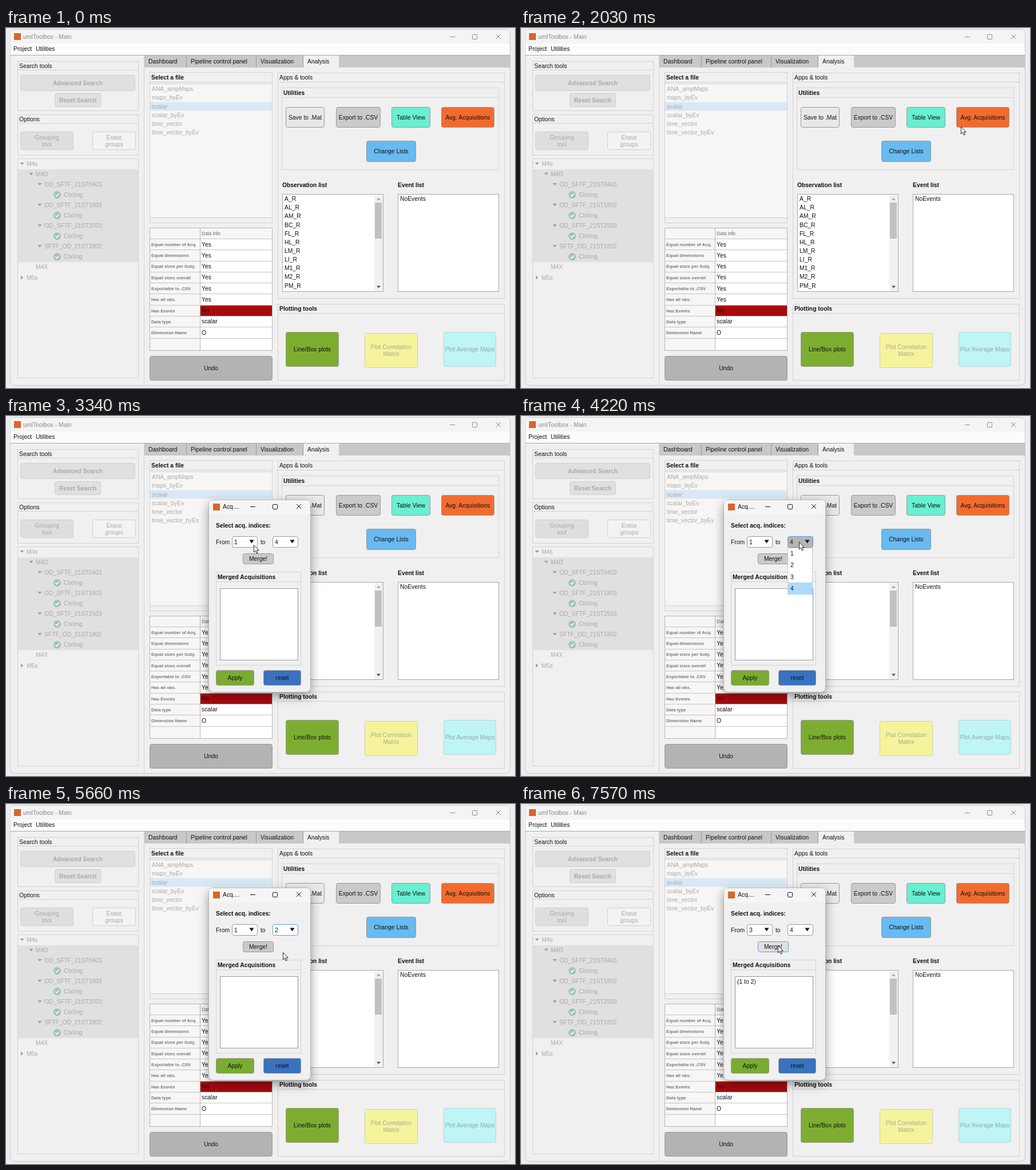
These frames come from a looping animation (890 px wide and 629 px high, 8000 ms). An HTML page:

```html
<!DOCTYPE html>
<html lang="en">
<head>
<meta charset="utf-8">
<title>Toolbox</title>
<style>
  html, body { margin: 0; width: 100%; height: 100%; overflow: hidden; background: #ededed; }
  svg { display: block; }
  text { font: 10.35px "Liberation Sans", Arial, sans-serif; white-space: pre; }
  .b { font-weight: bold; }
  .m { text-anchor: middle; }
  .s { font-size: 7.7px; }
  #dialog { filter: drop-shadow(0 7px 9px rgba(0, 0, 0, .38)); }
</style>
</head>
<body>
<svg id="stage" width="890" height="629" viewBox="0 0 890 629"></svg>
<script>
const LINE = '#d2d2d2', BG = '#f0f0f0', DIM = '#a9a9a9', EDGE = '#999';

// Corner-to-corner box with a one pixel border
const box = (x, y, x2, y2, fill, stroke = LINE, r = 0, id = '') =>
  `<rect id="${id}" x="${x + .5}" y="${y + .5}" width="${x2 - x}" height="${y2 - y}" rx="${r}" fill="${fill}" stroke="${stroke}"/>`;
const fillBox = (x, y, x2, y2, fill) =>
  `<rect x="${x}" y="${y}" width="${x2 - x}" height="${y2 - y}" fill="${fill}"/>`;
const path = (d, stroke, fill = 'none', extra = '') => `<path d="${d}" stroke="${stroke}" fill="${fill}" ${extra}/>`;
const hline = (x, x2, y, c = LINE) => path(`M${x} ${y + .5}H${x2}`, c);
const vline = (x, y, y2, c = LINE) => path(`M${x + .5} ${y}V${y2}`, c);
// Text is placed by the vertical middle of its capitals
const text = (x, y, s, fill = '#111', cls = '', id = '') =>
  `<text id="${id}" x="${x}" y="${y + 3.6}" fill="${fill}" class="${cls}">${s}</text>`;
const panel = (x, y, x2, y2, title, bar, cls = '') =>
  box(x, y, x2, y2, 'none') + hline(x, x2, bar) + text(x + 3, (y + bar) / 2 + .5, title, '#111', cls);
const button = (x, y, x2, y2, fill, label, o = {}) => {
  const rows = label.split('|'), mid = (y + y2) / 2 + .5;
  return box(x, y, x2, y2, fill, o.edge || EDGE, 3, o.id) + rows.map((row, i) =>
    text((x + x2) / 2 + .5, mid + (i - (rows.length - 1) / 2) * 12, row, o.color, 'm ' + (o.cls || ''))).join('');
};
const down = (x, y, w, h, fill) => path(`M${x - w} ${y - h}H${x + w}L${x} ${y + h}Z`, 'none', fill);
const logo = (x, y) => fillBox(x, y, x + 12, y + 12, '#d9662b');
const windowIcons = (a, b, c, y) =>
  path(`M${a} ${y + .5}h9M${b + .5} ${y - 3.5}h6q1 0 1 1v6q0 1-1 1h-6q-1 0-1-1v-6q0-1 1-1M${c} ${y - 4}l8 8m0-8l-8 8`, 'currentColor');

function mainWindow() {
  let s = box(7, 2, 881, 624, BG, '#c9c9c9', 8);
  s += path('M7.5 46V11q0-8 8-8H873q8 0 8 8V46Z', 'none', '#f4f4f4');
  s += fillBox(8, 27, 881, 47, '#fcfcfc') + hline(8, 881, 47, '#a5aba5');
  s += logo(14, 9);
  s += `<g id="caption">${text(30, 15.5, 'umIToolbox - Main', 'currentColor')}${windowIcons(776, 816, 857, 15)}</g>`;
  s += text(13, 36, 'Project') + text(52, 36, 'Utilities');

  // Tabs
  s += fillBox(242, 48, 881, 69, '#c8c8c8') + vline(241, 48, 624);
  s += fillBox(520, 48, 582, 70, BG);
  [315, 437, 519].forEach(x => s += vline(x, 49, 69, '#999'));
  s += text(249, 58.5, 'Dashboard') + text(323, 58.5, 'Pipeline control panel') +
    text(445, 58.5, 'Visualization') + text(527, 58.5, 'Analysis');
  return s;
}

function sidebar() {
  const off = { color: DIM, edge: '#cfcfcf' }, offBold = { ...off, cls: 'b' };
  let s = panel(20, 58, 231, 144, 'Search tools', 73) + panel(20, 151, 231, 222, 'Options', 166);
  s += button(25, 82, 225, 109, '#e0e0e0', 'Advanced Search', offBold);
  s += button(85, 114, 165, 137, '#e0e0e0', 'Reset Search', offBold);
  s += button(25, 181, 117, 212, '#dedede', 'Grouping|tool', off);
  s += button(151, 181, 226, 212, '#f3f3f3', 'Erase|groups', off);
  s += box(20, 228, 231, 611, BG) + fillBox(21, 247, 231, 409, '#e0e0e0');
  const node = (x, y, label) => down(x - 8, y, 3.5, 2, '#999') + text(x, y, label, DIM);
  s += node(36, 237, 'M4s') + node(52, 255, 'M4D');
  ['OD_SFTF_21ST0403', 'OD_SFTF_21ST1803', 'OD_SFTF_21ST2503', 'SFTF_OD_21ST1802'].forEach((name, i) => {
    const y = 273 + i * 36.1;
    s += node(67, y, name) + `<circle cx="89.5" cy="${y + 18.5}" r="6.5" fill="#a3c3b5"/>`;
    s += path(`M86.5 ${y + 18.5}l2.3 2.4 4-4.6`, '#fff', 'none', 'stroke-width="1.6"') + text(101, y + 18.5, 'CtxImg', DIM);
  });
  s += text(52, 417.5, 'M4X', DIM) + text(36, 436, 'M5s', DIM);
  return s + path('M26 432.5v7l4-3.5Z', 'none', '#999');
}

function fileColumn() {
  let s = panel(251, 77, 465, 340, 'Select a file', 94, 'b');
  s += box(251, 97, 465, 331, '#f7f6f4') + fillBox(252, 129.5, 465, 144.5, '#d9e8f4');
  ['ANA_ampMaps', 'maps_byEv', 'scalar', 'scalar_byEv', 'time_vector', 'time_vector_byEv']
    .forEach((name, i) => s += text(255, 106.5 + i * 15.2, name, '#aaa'));

  s += box(251, 349, 465, 563, '#f7f6f4', '#b5b5b5') + fillBox(340, 368, 465, 563, '#fff');
  s += `<text x="342" y="361.5" fill="#666" style="font-size:8.2px">Data info</text>`;
  s += fillBox(340, 484, 465, 503, '#a90a10');
  [['Equal number of Acq.', 'Yes'], ['Equal dimensions', 'Yes'], ['Equal sizes per Subj.', 'Yes'],
   ['Equal sizes overall', 'Yes'], ['Exportable to .CSV', 'Yes'], ['Has all obs.', 'Yes'],
   ['Has Events', 'No'], ['Data type', 'scalar'], ['Dimension Name', 'O']].forEach(([name, value], i) => {
    const y = 378 + i * 19.27;
    s += text(254, y - .7, name, '#777', 'b s') + text(342, y, value) + hline(251, 465, Math.round(y - 10), '#c4c4c4');
  });
  s += hline(251, 465, 542, '#c4c4c4') + vline(339, 349, 563, '#b5b5b5');
  return s + button(251, 573, 465, 615, '#b3b3b3', 'Undo');
}

function toolsColumn() {
  let s = panel(475, 78, 871, 472, 'Apps &amp; tools', 94) + panel(482, 104, 861, 247, 'Utilities', 121, 'b');
  s += button(489, 138, 556, 173, '#e8e8e8', 'Save to .Mat');
  s += button(577, 138, 654, 173, '#cacaca', 'Export to .CSV');
  s += button(674, 138, 741, 173, '#69efd1', 'Table View');
  s += button(761, 138, 853, 173, '#f26b2e', 'Avg. Acquisitions', { id: 'average' });
  s += button(630, 197, 716, 233, '#68baf0', 'Change Lists');

  s += text(483, 274.5, 'Observation list', '#111', 'b') + text(685, 274.5, 'Event list', '#111', 'b');
  s += box(483, 290, 659, 460, '#fff', '#aaa') + box(685, 290, 861, 460, '#fff', '#aaa');
  ['A_R', 'AL_R', 'AM_R', 'BC_R', 'FL_R', 'HL_R', 'LM_R', 'LI_R', 'M1_R', 'M2_R', 'PM_R']
    .forEach((name, i) => s += text(487, 298.5 + i * 15.15, name));
  s += text(689, 298.5, 'NoEvents');
  s += fillBox(644, 291, 659, 460, '#f1f1f1') + fillBox(645, 305, 657, 368, '#c1c1c1');
  s += path('M648 300.5h7l-3.5-4Z', 'none', '#a3a3a3') + down(651.5, 452.5, 3.5, 2, '#505050');

  s += panel(475, 482, 871, 615, 'Plotting tools', 498, 'b');
  s += button(489, 531, 581, 591, '#7dad30', 'Line/Box plots');
  s += button(627, 533, 719, 593, '#f5f49d', 'Plot Correlation|Matrix', { color: '#a8a88c', edge: '#d0d0b0' });
  return s + button(765, 531, 856, 591, '#bff5f6', 'Plot Average Maps', { color: '#8fabab', edge: '#b5d5d5' });
}

function dialog() {
  const combo = (x, name) => box(x, 210, x + 44, 229, '#fff', EDGE, 3, name + 'Box') +
    text(x + 4, 220, '', '#111', '', name) + down(x + 34.5, 219.5, 4, 3, '#111');
  let s = `<g id="dialog">${box(354, 146, 532, 482, BG, '#b5b5b5', 8)}</g>`;
  s += path('M355 172V154q0-7 7-7H525q7 0 7 7V172Z', 'none', '#f5f5f5') + logo(362, 153);
  s += `<g color="#111">${text(379, 158.5, 'Acq....')}${windowIcons(427, 467, 508, 158)}</g>`;
  s += text(367, 191, 'Select acq. indices:', '#111', 'b') + text(367, 220, 'From') + text(445, 220, 'to');
  s += combo(395, 'from') + combo(466, 'to');
  s += button(414, 240, 467, 258, '#cacaca', 'Merge!', { id: 'merge' });
  s += panel(367, 272, 515, 435, 'Merged Acquisitions', 289, 'b');
  s += box(374, 301, 510, 426, '#fff', '#999') + text(378, 310.5, '(1 to 2)', '#111', '', 'merged');
  s += button(367, 444, 433, 470, '#79ac30', 'Apply') + button(450, 444, 515, 470, '#3972c0', 'reset');
  s += `<g id="menu">${box(466, 230, 509, 311, '#fff', '#c4c4c4')}<rect id="hover" x="467" width="42" height="20" fill="#e4e4e4"/>`;
  s += fillBox(466, 291, 510, 312, '#aed9fc');
  [1, 2, 3, 4].forEach(n => s += text(471, 220 + n * 20.3, n));
  return s + '</g>';
}

const cursor = `<g id="cursor">${path('M.5.5V13L3.4 10.3 5.4 15 7.4 14.1 5.4 9.6H9.3Z', '#111', '#fff', 'stroke-width=".9"')}
  <circle id="busy" cx="9.5" cy="1" r="3.8" fill="none" stroke="#2490e6" stroke-width="2.4"/></g>`;

document.getElementById('stage').innerHTML = mainWindow() + sidebar() + fileColumn() + toolsColumn() +
  `<g id="popup">${dialog()}</g>` + cursor;

// Pointer stops: time, x, y
const route = [
  [1000, 852, 597], [1200, 800, 500], [1450, 716, 340], [1600, 702, 275], [1760, 718, 235], [2030, 769, 172],
  [2200, 773, 169], [2480, 773, 169], [2590, 440, 163], [2900, 412, 190], [3050, 400, 206], [3340, 433, 225],
  [3480, 425, 225], [3620, 403, 223], [3950, 455, 222], [4150, 486, 220], [4640, 486, 220], [5030, 484, 258],
  [5170, 484, 259], [6400, 484, 259], [6710, 450, 249], [6910, 449, 247]
];
function pointerAt(t) {
  const i = route.findIndex(stop => stop[0] > t);
  if (i < 1) return route[i < 0 ? route.length - 1 : 0].slice(1);
  const [t0, x0, y0] = route[i - 1], [t1, x1, y1] = route[i], k = (t - t0) / (t1 - t0);
  return [x0 + (x1 - x0) * k, y0 + (y1 - y0) * k];
}

const el = id => document.getElementById(id);
const set = (id, attrs) => Object.entries(attrs).forEach(([k, v]) => el(id).setAttribute(k, v));
const show = (id, on) => set(id, { display: on ? 'inline' : 'none' });

function draw(t) {
  const within = (a, b) => t >= a && t < b;
  const [x, y] = pointerAt(t);
  show('cursor', t >= 1000);
  set('cursor', { transform: `translate(${x.toFixed(1)} ${y.toFixed(1)})` });
  show('busy', within(2330, 2520));
  set('caption', { color: within(2250, 2520) ? '#111' : '#888' });
  set('average', { fill: within(2100, 2520) ? '#f5976c' : '#f26b2e' });

  show('popup', t >= 2520);
  show('menu', within(4150, 5660));
  show('hover', y > 230);
  set('hover', { y: y < 250 ? 231 : 251 });
  el('from').textContent = t < 7500 ? 1 : 3;
  el('to').textContent = within(5660, 7570) ? 2 : 4;
  set('toBox', {
    fill: within(4080, 4760) ? '#b5b5b5' : '#fff',
    stroke: within(4150, 7300) ? '#5a9de8' : EDGE
  });
  set('merge', {
    fill: t >= 6640 ? '#e0e0e0' : '#cacaca',
    stroke: t >= 7300 ? '#5a9de8' : EDGE
  });
  show('merged', t >= 7440);
}

function tick() {
  draw(performance.now() % 8000);
  requestAnimationFrame(tick);
}
tick();
</script>
</body>
</html>
```
